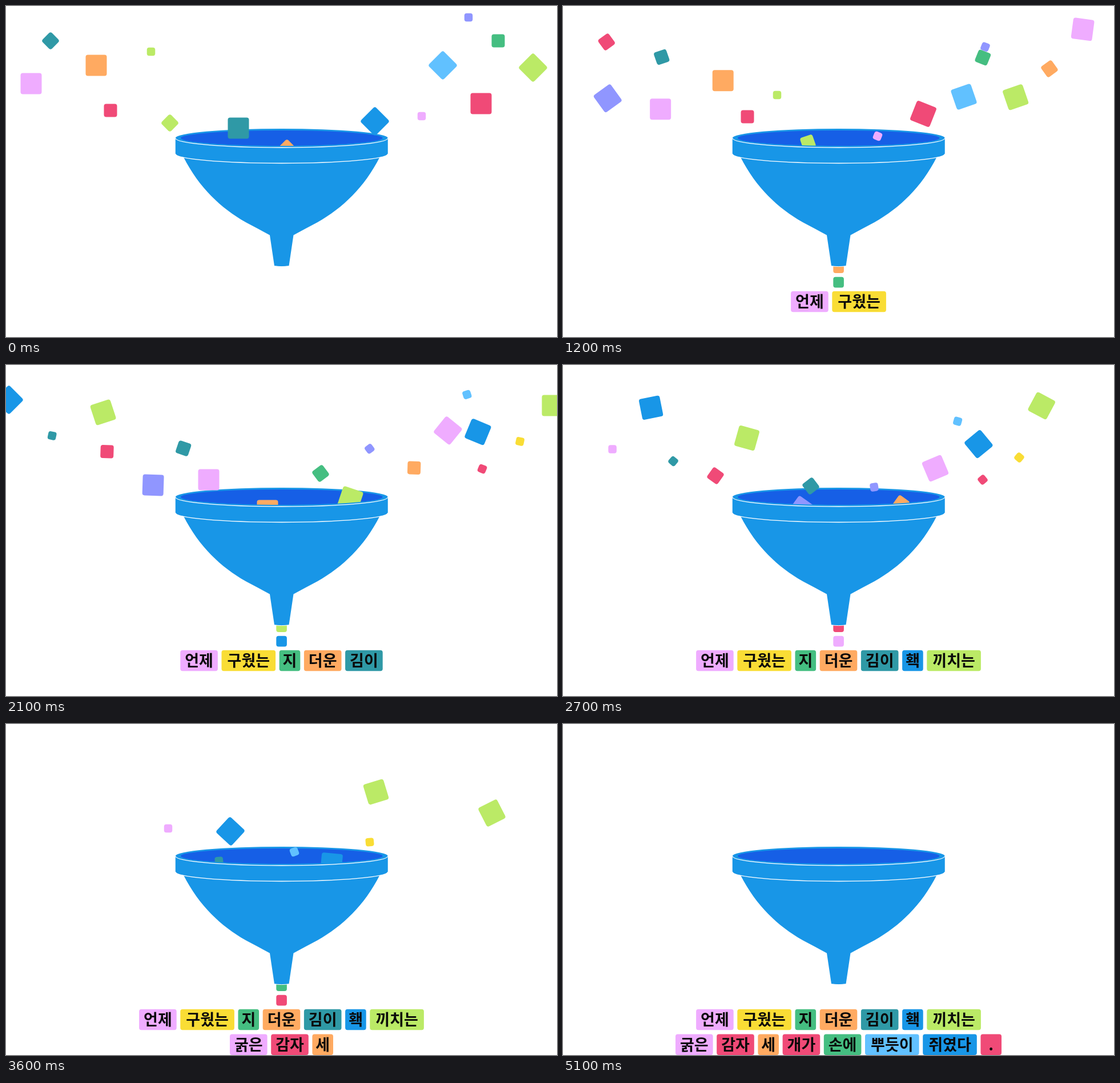
These frames come from a looping animation (965 by 580 pixels, 7.4 s). An HTML page with a canvas:

```html
<!DOCTYPE html>
<html lang="ko">
<head>
<meta charset="utf-8">
<style>
html, body { margin: 0; width: 100%; height: 100%; overflow: hidden; background: #fff; }
canvas { display: block; }
</style>
</head>
<body>
<canvas width="965" height="580"></canvas>
<script>
const g = document.querySelector('canvas').getContext('2d');
const LOOP = 7400, STEP = 300, LAST = 17;
const pink = '#efacff', lime = '#bbea66', orange = '#ffaa61', teal = '#2f99a6', red = '#f04a77',
  purple = '#9096ff', sky = '#61c1ff', green = '#45be81', yellow = '#f9dd35', blue = '#1896e7', deep = '#165fe6';
const L = 37, M = 23, S = 14.5;

const words = [
  ['언제', pink], ['구웠는', yellow], ['지', green], ['더운', orange], ['김이', teal], ['홱', blue], ['끼치는', lime],
  ['굵은', pink], ['감자', red], ['세', orange], ['개가', red], ['손에', green], ['뿌듯이', sky], ['쥐였다', blue], ['.', red]
];

// The shared stream speeds up evenly, then keeps its pace.
const RAMP = 8.6;
function flow(k) {
  const r = Math.min(k, RAMP);
  return 0.5 * r + 0.145 * r * r + 3 * (k - r);
}

// A block drifts from one point to the next along a bowed line, then drops.
const blocks = [];
function block(angle, spin, color, size, [k0, x0, y0], [k1, x1, y1], bow = 0) {
  const from = flow(k0), to = flow(k1);
  blocks.push(k => {
    if (k < k0) return;
    const t = flow(k), u = (t - from) / (to - from);
    const x = x0 + (x1 - x0) * u;
    const y = y0 + (y1 - y0) * u + 4 * bow * u * (1 - u) + 6 * Math.max(0, t - to) ** 2;
    if (y > 275) return;
    g.save();
    g.translate(x, y);
    g.rotate((angle + spin * (t - from)) * Math.PI / 180);
    box(-size / 2, -size / 2, size, size, color);
    g.restore();
  });
}
const diamond = (...a) => block(45, 6, ...a);
const roller = (...a) => block(0, 5, ...a);
const slider = (...a) => block(0, 0, ...a);

diamond(orange, M, [0, 492, 249], [1, 485, 262]);
diamond(lime, M, [0, 287, 205], [4, 429, 239]);
diamond(teal, M, [0, 78, 61], [9, 434, 212], -15);
diamond(blue, L, [0, 646, 202], [2, 580, 240]);
diamond(sky, L, [0, 765, 104], [4, 702, 159]);
diamond(lime, L, [0, 923, 108], [7, 603, 235]);
diamond(red, M, [3, 52, 35], [9, 267, 194], 25);
diamond(purple, L, [3, 35, 150], [9, 418, 254]);
diamond(orange, M, [3, 885, 93], [9, 592, 243]);
diamond(lime, L, [5, 49, 47], [9, 322, 128]);
diamond(blue, L, [7, 5, 61], [12, 393, 188], -37);
diamond(sky, S, [5, 900, 32], [12, 505, 224], -35);
diamond(lime, L, [11, 955, 140], [13, 747, 172]);

roller(pink, S, [0, 728, 193], [4, 551, 228]);
roller(red, L, [0, 832, 171], [4, 631, 189]);
roller(green, M, [0, 862, 61], [7, 551, 190], -24);
roller(purple, S, [0, 810, 20], [9, 545, 214]);
roller(pink, L, [3, 943, 23], [9, 652, 181]);
roller(blue, L, [5, 905, 125], [12, 570, 245], -50);
roller(red, S, [5, 913, 167], [9, 735, 201]);
roller(yellow, S, [6, 943, 122], [12, 637, 207]);
roller(teal, S, [6, 33, 105], [12, 373, 240]);
roller(lime, L, [7, 957, 71], [12, 648, 119], -19);

slider(teal, L, [0, 407, 214], [2, 450, 245]);
slider(red, M, [0, 183, 183], [4, 323, 194]);
slider(lime, S, [0, 254, 80], [4, 375, 156]);
slider(pink, L, [0, 44, 136], [7, 355, 201], 19);
slider(orange, L, [0, 158, 104], [7, 458, 255], -36);
slider(pink, S, [8, 22, 136], [12, 284, 183]);

function box(x, y, w, h, color) {
  g.fillStyle = color;
  g.beginPath();
  g.roundRect(x, y, w, h, 4);
  g.fill();
}

const CX = 482.75, RIM = 231.5, BAND = 259, RX = 186, RY = 16.5;

function disc(rx, ry, color) {
  g.fillStyle = color;
  g.beginPath();
  g.ellipse(CX, RIM, rx, ry, 0, 0, 7);
  g.fill();
}

function lowerArc(y) {
  g.beginPath();
  g.ellipse(CX, y, RX, RY, 0, 0, Math.PI);
  g.stroke();
}

const bowl = new Path2D('M311 265C338 318 376 354 420 379Q441 390 462 401.5L470 455.3Q482.7 457 495.5 455.3L503.5 401.5Q524.5 390 545.5 379C589.5 354 627.5 318 654.5 265Z');
const neckEdge = new Path2D('M469 456Q482.7 457.2 496.5 456');

function drawFront() {
  g.fillStyle = blue;
  g.fill(bowl);
  g.beginPath();
  g.ellipse(CX, RIM, 177, 13.5, 0, Math.PI, 0, true);
  g.lineTo(CX + RX, RIM);
  g.ellipse(CX, BAND, RX, RY, 0, 0, Math.PI);
  g.lineTo(CX - RX, RIM);
  g.fill();
  g.strokeStyle = '#fff';
  g.lineWidth = 1.3;
  lowerArc(RIM);
  lowerArc(BAND);
  g.lineWidth = 1;
  g.stroke(neckEdge);
}

function drawRow(row, y) {
  const gap = 6.6, width = w => 7.6 + 29 * w.length;
  let x = CX - 0.25 - row.reduce((sum, [w]) => sum + width(w) + gap, -gap) / 2;
  for (const [w, color] of row) {
    box(x, y, width(w), 36.5, color);
    g.fillStyle = '#0a0a0a';
    g.fillText(w, x + width(w) / 2, y + 28.5);
    x += width(w) + gap;
  }
}

function draw(k) {
  g.fillStyle = '#fff';
  g.fillRect(0, 0, 965, 580);
  disc(RX, RY, blue);
  disc(177, 13.5, deep);
  for (const show of blocks) show(k);
  const upper = words[k - 1], lower = words[k - 2];
  if (upper) box(473.3, 449.5, 18.6, 18.6, upper[1]);
  if (lower) box(473.3, 474.8, 18.6, 18.6, lower[1]);
  drawFront();
  g.font = 'bold 27px "Noto Sans CJK KR", "Noto Sans CJK", sans-serif';
  g.textAlign = 'center';
  const shown = words.slice(0, Math.max(0, k - 2));
  drawRow(shown.slice(0, 7), 499.8);
  drawRow(shown.slice(7), 543.5);
}

const start = performance.now();
function tick() {
  const t = (performance.now() - start) % LOOP;
  draw(Math.min(LAST, Math.floor(t / STEP)));
  requestAnimationFrame(tick);
}
tick();
</script>
</body>
</html>
```
